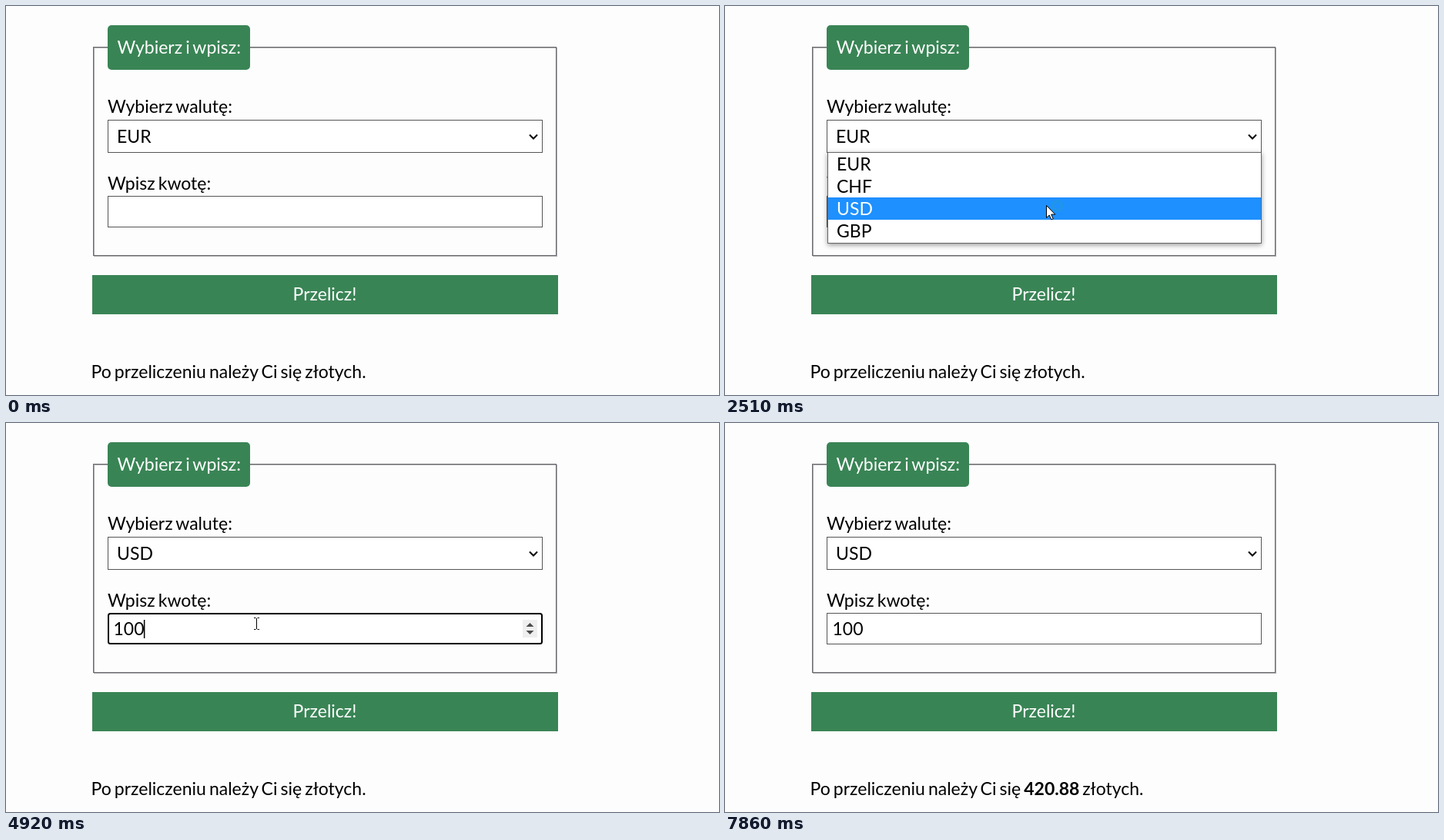
Write an HTML page that moves like this. It is 926 by 506 pixels and loops after 8260 ms.

```html
<!DOCTYPE html>
<html lang="pl">
<head>
<meta charset="utf-8">
<title>Kalkulator walut</title>
<style>
  html, body { margin: 0; width: 100%; height: 100%; overflow: hidden; background: #fdfdfd; }
  svg { display: block; width: 926px; height: 506px; }
  text { font: 23px Lato, sans-serif; word-spacing: -1.8px; fill: #000; white-space: pre; }
  .light { fill: #fff; }
  .field { fill: #fff; stroke: #555; stroke-width: 1; }
  .field.focus { stroke: #000; stroke-width: 2; }
  #list { filter: drop-shadow(0 2px 3px rgba(0, 0, 0, .4)); }
</style>
</head>
<body>
<svg viewBox="0 0 926 506">
  <rect width="926" height="506" fill="#fdfdfd"/>

  <g fill="none">
    <rect x="114.5" y="54.5" width="601" height="271" stroke="#a9a9ac"/>
    <rect x="113.5" y="53.5" width="601" height="271" stroke="#6b6b70"/>
  </g>
  <rect x="132" y="25" width="185" height="58" rx="5" fill="#398455"/>
  <text class="light" x="144.5" y="62">Wybierz i wpisz:</text>

  <text x="132" y="139">Wybierz walutę:</text>
  <rect id="select" class="field"/>
  <text id="currency" x="144" y="178"></text>
  <path d="M680 167.5l5 5 5-5" fill="none" stroke="#000" stroke-width="2"/>

  <text x="132" y="239">Wpisz kwotę:</text>
  <rect id="input" class="field"/>
  <text id="amount" x="139.5" y="276"></text>
  <rect id="caret" y="256" width="1.5" height="24"/>
  <g id="spinner">
    <rect x="671" y="256" width="19" height="23" fill="#efefef"/>
    <path d="M675.5 265l5-5 5 5zM675.5 270l5 5 5-5z" fill="#4d4d4d"/>
  </g>

  <rect id="button" x="112" y="350" width="605" height="51"/>
  <text class="light" x="414" y="383" text-anchor="middle">Przelicz!</text>
  <text x="110.5" y="484">Po przeliczeniu należy Ci się <tspan id="result" font-weight="700"></tspan>złotych.</text>

  <g id="menu">
    <rect id="list" x="133.5" y="190.5" width="563" height="118" fill="#fff" stroke="#666"/>
    <rect id="mark" x="134" width="562" height="29" fill="#1e90ff"/>
    <g id="options"></g>
  </g>

  <g id="cursor">
    <g id="arrow">
      <circle id="busy" cx="14.5" cy="1" r="5.8" fill="none" stroke="#2196e8" stroke-width="4.2" opacity=".85"/>
      <path d="M.5.5V16.5L4.2 13 6.8 18.8 9.2 17.8 6.7 12.1H11.8Z" fill="#fff" stroke="#000"/>
    </g>
    <path id="beam" d="M-3.5-7.5H-1M1-7.5H3.5M0-7V7M-3.5 7.5H-1M1 7.5H3.5" fill="none" stroke="#000"/>
  </g>
</svg>
<script>
const LOOP = 8260, STEP = 67, BLINK = 530;
const CODES = ["EUR", "CHF", "USD", "GBP"];
const ROW_TOP = 191, ROW = 29;
const ENTER = 70, OPEN = 1530, CLOSE = 2740, FOCUS = 3630;
const TYPE = 4510, KEY_GAP = 205, CLICK = 5920, ANSWER = 6050, LEAVE = 7860;

// Each move eases out to (x, y); px and py set how sharply each axis slows
const moves = [
  { from: ENTER, to: 1220, x: 551, y: 165, px: 3, py: 1.45 },
  { from: 1290, to: 1750, x: 555, y: 172 },
  { from: 1750, to: 2640, x: 417, y: 263, px: 4, py: 1.77 },
  { from: 2670, to: 3020, x: 415, y: 259 },
  { from: 3150, to: FOCUS, x: 325, y: 261 },
  { from: 5380, to: 5660, x: 329, y: 366, py: 2.3 },
  { from: 7320, to: LEAVE, x: 830, y: 506 }
];

const $ = id => document.getElementById(id);
const show = (id, on) => $(id).setAttribute("visibility", on ? "visible" : "hidden");
const set = (id, attrs) => {
  for (const key in attrs) $(id).setAttribute(key, attrs[key]);
};
const easeOut = (u, power) => 1 - (1 - u) ** power;

const labels = CODES.map((code, i) => {
  const label = document.createElementNS("http://www.w3.org/2000/svg", "text");
  label.textContent = code;
  label.setAttribute("x", 145);
  label.setAttribute("y", ROW_TOP + ROW * i + 23);
  return $("options").appendChild(label);
});

function pointer(t) {
  let x = 810, y = 496;
  for (const m of moves) {
    if (t < m.from) break;
    const elapsed = Math.floor((t - m.from) / STEP) * STEP;
    const u = Math.min(1, elapsed / (m.to - m.from));
    x += (m.x - x) * easeOut(u, m.px || 1);
    y += (m.y - y) * easeOut(u, m.py || 1);
  }
  return [Math.round(x), Math.round(y)];
}

function drawField(id, y, height, focused) {
  const inset = focused ? 1 : .5;
  $(id).classList.toggle("focus", focused);
  set(id, {
    x: 132 + inset, y: y + inset, rx: focused ? 2.5 : 0,
    width: 565 - 2 * inset, height: height - 2 * inset
  });
}

function draw(t) {
  const [x, y] = pointer(t);
  const visible = t >= ENTER && t < LEAVE;
  const open = t >= OPEN && t < CLOSE;
  const over = (top, bottom, left, right) =>
    visible && y >= top && y < bottom && x >= left && x < right;

  drawField("select", 148, 43, t >= CLOSE && t < FOCUS);
  $("currency").textContent = t < CLOSE ? "EUR" : "USD";

  const focused = t >= FOCUS && t < CLICK;
  const typed = Math.max(0, Math.min(3, Math.floor((t - TYPE) / KEY_GAP) + 1));
  const lastKey = typed ? TYPE + (typed - 1) * KEY_GAP : FOCUS;
  drawField("input", 247, 41, focused);
  $("amount").textContent = "100".slice(0, typed);
  set("caret", { x: 139.3 + typed * 13.2 });
  show("caret", focused && Math.floor((t - lastKey) / BLINK) % 2 === 0);
  show("spinner", t >= CLOSE && t < CLICK);

  set("button", { fill: over(350, 401, 112, 717) ? "#0a6a10" : "#398455" });
  $("result").textContent = t >= ANSWER ? "420.88 " : "";

  const row = Math.max(0, Math.min(3, Math.floor((y - ROW_TOP) / ROW)));
  show("menu", open);
  set("mark", { y: ROW_TOP + ROW * row });
  labels.forEach((label, i) => label.classList.toggle("light", i === row));

  const typing = t >= CLOSE && over(247, 288, 132, 697);
  set("cursor", { transform: `translate(${typing ? x + .5 : x} ${y})` });
  show("arrow", visible && !typing);
  show("busy", visible && t < CLOSE);
  show("beam", visible && typing);
}

const start = performance.now();
function tick() {
  draw((performance.now() - start) % LOOP);
  requestAnimationFrame(tick);
}
tick();
</script>
</body>
</html>
```
